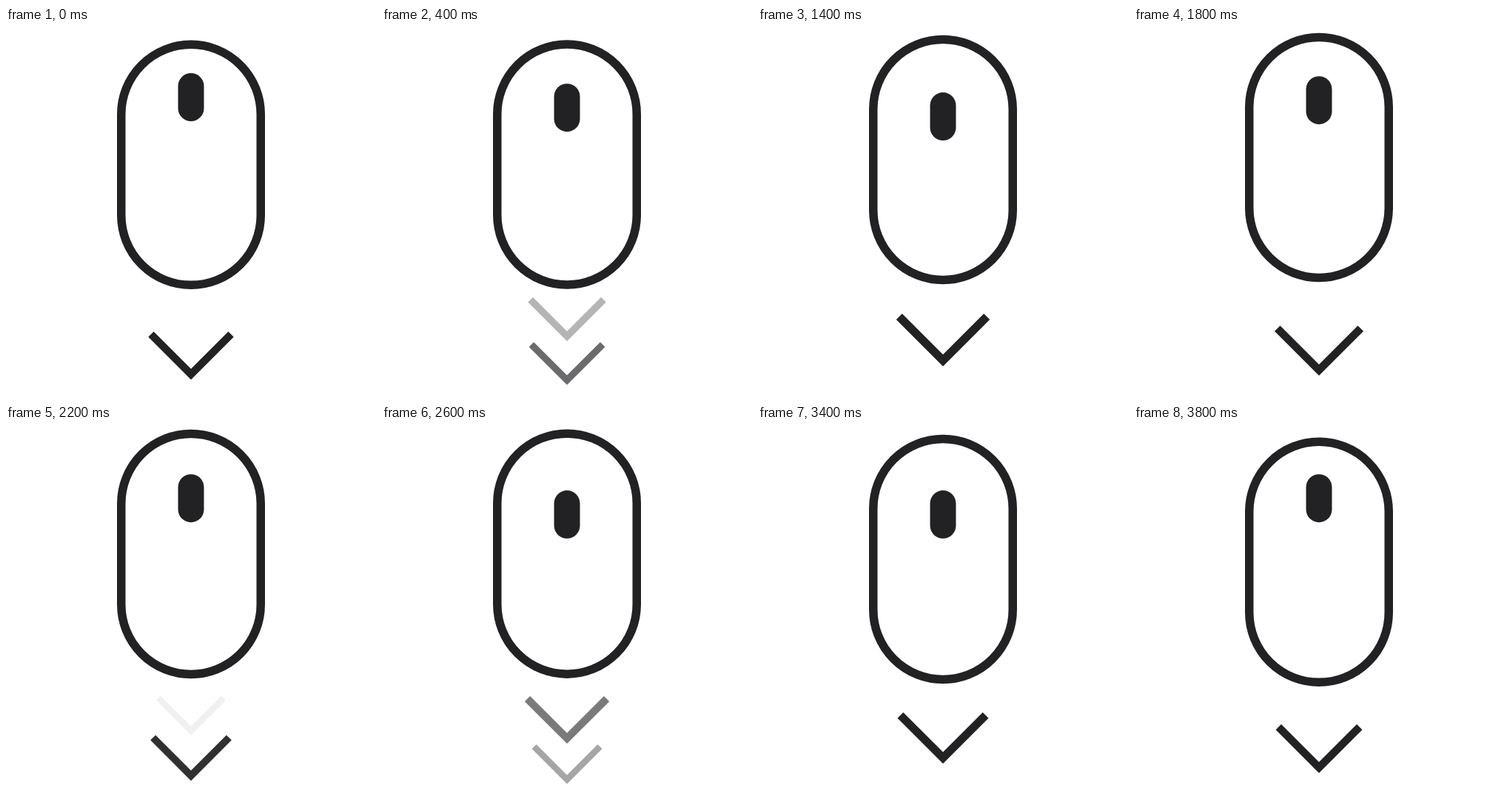
Animation of 500x500 px, one loop 4 s. Source, as an HTML page:

```html
<!DOCTYPE html>
<html lang="en">
<head>
<meta charset="utf-8">
<title>Scroll down</title>
<style>
  html, body { margin: 0; width: 100%; height: 100%; overflow: hidden; background: #fff; }
  svg { display: block; width: 100%; height: 100%; }
</style>
</head>
<body>
<svg viewBox="0 0 500 500" fill="none" stroke="#222224" stroke-width="11.5">
  <rect id="body" x="155.75" width="188.5" height="325" rx="94.25"/>
  <rect id="wheel" x="232.5" width="35" height="65" rx="17.5" fill="#222224" stroke="none"/>
  <g id="arrows"></g>
</svg>
<script>
const LOOP = 4000, STEP = 200, CYCLE = 2000;
const PEAK = 2500, TURN = 100;

const clamp = x => Math.min(1, Math.max(0, x));
const ease = x => x * x * (3 - 2 * x);
const mix = (a, b, x) => a + (b - a) * x;

const body = document.getElementById('body');
const wheel = document.getElementById('wheel');
const arrows = [
  { birth: -CYCLE, size: 1 },
  { birth: 0, size: 1 },
  { birth: CYCLE, size: 0.973 }
].map(arrow => {
  const path = document.createElementNS('http://www.w3.org/2000/svg', 'path');
  path.setAttribute('d', 'M-60.2 -32.1L0 28.1L60.2 -32.1');
  document.getElementById('arrows').append(path);
  return { ...arrow, path };
});

// Each arrow fades in while the previous one fades out
const fade = age => clamp((age - 150) / 750);

function drawArrow({ birth, size, path }, t) {
  const age = t - birth;
  const y = mix(390.5, 460, (1 - Math.cos(Math.PI * age / 3000)) / 2);
  const grow = mix(0.8, 1, ease(fade(age)));
  const shrink = 1 - 0.102 * (age / 1000 - 1) ** 2;
  path.setAttribute('transform', `translate(250 ${y}) scale(${size * grow * shrink})`);
  path.setAttribute('opacity', fade(age) * (1 - fade(age - CYCLE)));
}

function draw(t) {
  const phase = (t - TURN + LOOP) % LOOP;
  const rise = PEAK - TURN;
  const lift = phase < rise ? phase / rise : (LOOP - phase) / (LOOP - rise);
  body.setAttribute('y', mix(22.5, 10, ease(lift)));

  const roll = 1 - Math.abs(t % CYCLE / 1000 - 1);
  wheel.setAttribute('y', mix(61, 101.3, ease(roll)));

  arrows.forEach(arrow => drawArrow(arrow, t));
}

const start = performance.now();
function tick() {
  const t = (performance.now() - start) % LOOP;
  draw(Math.floor(t / STEP) * STEP);
  requestAnimationFrame(tick);
}
tick();
</script>
</body>
</html>
```
